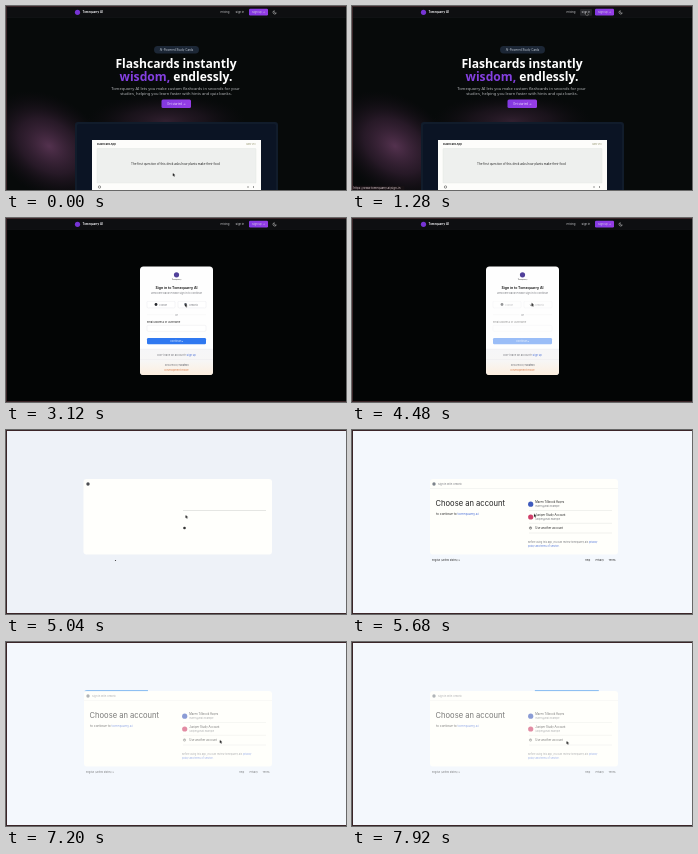
An HTML page for the animation above (8000 ms loop, 340 px wide and 184 px high).

```html
<!DOCTYPE html>
<html lang="en">
<head>
<meta charset="utf-8">
<title>Sign-in walkthrough</title>
<style>
html, body { margin: 0; width: 100%; height: 100%; overflow: hidden; background: #020505; }
svg { display: block; width: 100vw; height: 100vh; }
text { font: 2.6px Inter, "Noto Sans", sans-serif; fill: #222; }
.mid { text-anchor: middle; }
.bold { font-weight: 700; }
.nav { font-size: 2.7px; fill: #d8d8dc; }
.hero { font: 600 12.1px "Noto Sans", sans-serif; fill: #fff; }
.lead { font: 4.05px "Noto Sans", sans-serif; fill: #b4b6b9; }
.soft { fill: #75777d; }
.link { fill: #4a6fd8; }
.name { font-size: 2.8px; }
.tiny { font-size: 2.4px; }

/* One shared 8 s timeline */
.landing, .login, .loading, .accounts, .hover, .status, .progress, .picked {
  animation: 8s step-end infinite; visibility: hidden;
}
.landing { animation-name: landing; }
.login { animation-name: login; }
.loading { animation-name: loading; }
.accounts { animation-name: accounts; }
.hover { animation-name: hover; }
.status { animation-name: status; }
.progress { animation-name: progress; }
.picked { animation-name: picked; }
@keyframes landing { 0% { visibility: visible } 25%, 100% { visibility: hidden } }
@keyframes login { 25% { visibility: visible } 63%, 100% { visibility: hidden } }
@keyframes loading { 63% { visibility: visible } 64%, 100% { visibility: hidden } }
@keyframes accounts { 64%, 100% { visibility: visible } }
@keyframes hover { 12% { visibility: visible } 27%, 100% { visibility: hidden } }
@keyframes status { 14% { visibility: visible } 30%, 100% { visibility: hidden } }
@keyframes progress { 83.75%, 100% { visibility: visible } }
@keyframes picked { 79% { visibility: visible } 86%, 100% { visibility: hidden } }

.busy { animation: busy 8s linear infinite; }
@keyframes busy { 0%, 42% { opacity: 1 } 46%, 100% { opacity: .48 } }
.dim { animation: dim 8s linear infinite; }
@keyframes dim { 0%, 78% { opacity: 1 } 79%, 100% { opacity: .6 } }
.icon { animation: icon 8s step-end infinite; }
@keyframes icon { 0% { opacity: 1 } 44%, 100% { opacity: 0 } }
.spinner { animation: spinner 8s linear infinite; transform-origin: 179.5px 86.5px; }
@keyframes spinner {
  0%, 43.9% { opacity: 0; transform: none }
  44% { opacity: 1; transform: none }
  56%, 100% { opacity: 1; transform: rotate(720deg) }
}

.cursor { animation: cursor 8s ease-in-out infinite; }
@keyframes cursor {
  0%, 1% { transform: translate(166.7px, 167px) }
  11% { transform: translate(232px, 10px) }
  14%, 25% { transform: translate(234px, 6px) }
  35% { transform: translate(174px, 92px) }
  40%, 70% { transform: translate(179.5px, 85px) }
  74%, 79% { transform: translate(197.5px, 75.5px) }
  92%, 100% { transform: translate(214.5px, 99px) }
}

/* Indeterminate bar: 2 s cycle, in step with the 8 s loop */
.slide { animation: slide 2s -1.28s infinite; }
.grow { animation: grow 2s -1.28s infinite; }
@keyframes slide {
  0% { transform: translateX(-103.2px); animation-timing-function: cubic-bezier(.15, 0, .515, .41) }
  25% { transform: translateX(-32.4px); animation-timing-function: cubic-bezier(.31, .284, .8, .734) }
  48.35% { transform: translateX(55.5px); animation-timing-function: cubic-bezier(.4, .627, .6, .902) }
  100% { transform: translateX(198.1px) }
}
@keyframes grow {
  0% { transform: scaleX(.08); animation-timing-function: cubic-bezier(.205, .057, .577, .454) }
  19.15% { transform: scaleX(.457); animation-timing-function: cubic-bezier(.152, .196, .648, 1.004) }
  44.15% { transform: scaleX(.728); animation-timing-function: cubic-bezier(.258, -.003, .212, 1.38) }
  100% { transform: scaleX(.08) }
}
</style>
</head>
<body>
<svg viewBox="0 0 340 184" preserveAspectRatio="none">
  <defs>
    <radialGradient id="glow">
      <stop offset="0" stop-color="#5c3656" stop-opacity=".9"/>
      <stop offset=".5" stop-color="#3c233a" stop-opacity=".6"/>
      <stop offset="1" stop-color="#1a0f1a" stop-opacity="0"/>
    </radialGradient>
    <linearGradient id="violet">
      <stop offset="0" stop-color="#8339e2"/>
      <stop offset="1" stop-color="#963de6"/>
    </linearGradient>
    <linearGradient id="foot" x2="0" y2="1">
      <stop offset="0" stop-color="#f6f6f8"/>
      <stop offset=".45" stop-color="#f7f6f5"/>
      <stop offset="1" stop-color="#fdeedd"/>
    </linearGradient>
    <clipPath id="panel"><rect x="78" y="48" width="188" height="76.500" rx="3"/></clipPath>
    <clipPath id="sheet"><rect x="134" y="48.500" width="73" height="108.500" rx="3.500"/></clipPath>
  </defs>

  <rect width="340" height="184" fill="#030505"/>

  <g class="landing">
    <rect width="340" height="184" fill="#070a0a"/>
    <ellipse cx="43" cy="140" rx="68" ry="48" fill="url(#glow)" transform="rotate(35 43 140)"/>
    <ellipse cx="160" cy="115" rx="80" ry="27" fill="url(#glow)" opacity=".55"/>
    <rect x="148" y="40" width="45" height="7.500" rx="3.700" fill="#1c2736"/>
    <text class="mid" x="170.500" y="44.800" style="font-size:2.900px;fill:#c4ccd6">AI-Powered Study Cards</text>
    <text class="hero mid" x="170" y="61.500">Flashcards instantly</text>
    <text class="hero mid" x="170" y="74.500"><tspan fill="#8440e0">wisdom,</tspan> endlessly.</text>
    <text class="lead mid" x="169.500" y="83.600">Tomequarry AI lets you make custom flashcards in seconds for your</text>
    <text class="lead mid" x="170" y="89">studies, helping you learn faster with hints and quiz banks.</text>
    <rect x="155.500" y="93.500" width="29.500" height="8.500" rx="1.500" fill="url(#violet)"/>
    <text class="mid" x="170.300" y="98.800" style="font-size:2.900px;fill:#eadcff">Get started →</text>

    <rect x="69" y="116" width="203" height="72" rx="3" fill="#111c2b"/>
    <rect x="71" y="118" width="199" height="70" rx="2" fill="#0b1424"/>
    <rect x="86" y="134" width="169" height="50" fill="#fdfdfb"/>
    <text class="bold" x="91" y="139.300" style="font-size:2.700px">Flashcard App</text>
    <text x="240" y="139" style="font-size:2.200px;fill:#8b8b62">Card 1/10</text>
    <rect x="91" y="142.500" width="159" height="34.500" rx=".5" fill="#eef0ee" stroke="#dfe2df" stroke-width=".4"/>
    <text class="mid" x="169.500" y="159" style="font-size:3px">The first question of this deck asks how plants make their food</text>
    <circle cx="93.500" cy="181" r="1.200" fill="none" stroke="#333" stroke-width=".5"/>
    <path d="M242.500 180l-1 1 1 1M247 180l1 1-1 1" fill="none" stroke="#333" stroke-width=".5"/>
  </g>

  <g>
    <rect width="340" height="11.500" fill="#0e0f11"/>
    <rect y="11.500" width="340" height=".4" fill="#1b1c1f"/>
    <circle cx="71.500" cy="6.300" r="2.600" fill="#7734d4"/>
    <text class="bold" x="76.500" y="7.300" style="font-size:2.800px;fill:#f1f1f4">Tomequarry AI</text>
    <text class="nav" x="214.500" y="7.400">Pricing</text>
    <rect class="hover" x="228" y="3" width="12" height="6.800" rx="1" fill="#26272b"/>
    <text class="nav" x="229.500" y="7.400">Sign in</text>
    <rect x="243" y="2.800" width="19" height="6.600" rx="1.200" fill="url(#violet)"/>
    <text class="nav mid" x="252.500" y="7.200">Sign up →</text>
    <path d="M268.300 4.700a1.700 1.700 0 1 0 2 2.200a1.600 1.600 0 0 1-2-2.200z" fill="none" stroke="#ddd" stroke-width=".5"/>
  </g>

  <g class="login">
    <g clip-path="url(#sheet)">
      <rect x="134" y="48" width="73" height="110" fill="#fefefe"/>
      <rect x="134" y="131" width="73" height="27" fill="url(#foot)"/>
      <path d="M134 131.200h73M134 141.500h73" stroke="#e6e6ea" stroke-width=".4"/>
    </g>
    <circle cx="170.500" cy="56.800" r="2.600" fill="#51409a"/>
    <text class="mid" x="170.500" y="62.300" style="font-size:1.700px">Tomequarry</text>
    <text class="mid bold" x="170.500" y="71.300" style="font-size:3.500px">Sign in to Tomequarry AI</text>
    <text class="mid soft" x="170.500" y="76.400">Welcome back! Please sign in to continue</text>
    <g class="busy">
      <g fill="#fff" stroke="#e4e4e8" stroke-width=".4">
        <rect x="141" y="83.300" width="28" height="6.600" rx="1.200"/>
        <rect x="172" y="83.300" width="28" height="6.600" rx="1.200"/>
      </g>
      <circle cx="150" cy="86.500" r="1.400" fill="#24262b"/>
      <text class="soft" x="153.500" y="87.500">Forkle</text>
      <circle class="icon" cx="179.500" cy="86.500" r="1.400" fill="#5e6672"/>
      <text class="soft" x="183" y="87.500">Ombrix</text>
    </g>
    <path class="spinner" d="M179.500 85.200a1.300 1.300 0 1 1-1.300 1.300" fill="none" stroke="#555" stroke-width=".5"/>
    <path d="M141 96.700h26.500M173.500 96.700h26.500" stroke="#ececef" stroke-width=".3"/>
    <text class="mid soft" x="170.500" y="97.500">or</text>
    <g class="busy">
      <text x="141" y="105">Email address or username</text>
      <rect x="141" y="107.300" width="59" height="6" rx="1.200" fill="#fff" stroke="#e4e4e8" stroke-width=".4"/>
      <rect x="141" y="120" width="59" height="6.200" rx="1.200" fill="#2f78f0"/>
      <text class="mid" x="170.500" y="124" style="fill:#e6efff">Continue ▸</text>
    </g>
    <text class="mid soft" x="170.500" y="137.800">Don’t have an account? <tspan class="link">Sign up</tspan></text>
    <text class="mid soft" x="170.500" y="148">Secured by <tspan class="bold">Vostrel</tspan></text>
    <text class="mid" x="170.500" y="152.900" style="fill:#dc7a45">Development mode</text>
    <rect y="183" width="340" height="1" fill="#3b2629"/>
  </g>

  <g class="loading">
    <rect width="340" height="184" fill="#eef2f8"/>
    <rect x="77.500" y="49" width="188.500" height="75.500" rx="3" fill="#fffffc"/>
    <circle cx="82" cy="54" r="1.700" fill="#4a4c50"/>
    <path d="M177 80.500h83" stroke="#dadcd8" stroke-width=".7"/>
    <circle cx="178.500" cy="98" r="1.300" fill="#333"/>
    <circle cx="109.500" cy="130.500" r=".6" fill="#333"/>
    <rect y="183" width="340" height="1" fill="#3b2629"/>
  </g>

  <g class="accounts">
    <rect width="340" height="184" fill="#f4f8fd"/>
    <rect x="78" y="49" width="188" height="75.500" rx="3" fill="#fffffb"/>
    <rect class="picked" x="174" y="68" width="88" height="12.500" rx="1" fill="#f0f4fb"/>
    <g class="dim">
      <circle cx="82" cy="54" r="1.700" fill="#7d838a"/>
      <text x="86" y="55" class="soft">Sign in with Ombrix</text>
      <path d="M78 58.500h188" stroke="#e4e6e6" stroke-width=".4"/>
      <text x="83.500" y="75.800" style="font-size:7.600px">Choose an account</text>
      <text x="84" y="85.300" style="font-size:3.200px">to continue to <tspan class="link">tomequarry.ai</tspan></text>
      <circle cx="178.700" cy="74.200" r="2.600" fill="#3f5bbd"/>
      <text class="name" x="183.300" y="73.300">Maren Tilbrook Hayes</text>
      <text class="tiny soft" x="183.300" y="77.300">maren@mail.example</text>
      <circle cx="178.700" cy="87" r="2.600" fill="#d0406a"/>
      <text class="name" x="183.300" y="86.100">Juniper Study Account</text>
      <text class="tiny soft" x="183.300" y="90.100">juniper@mail.example</text>
      <circle cx="178.500" cy="98" r="1.200" fill="none" stroke="#444" stroke-width=".5"/>
      <circle cx="178.500" cy="97.800" r=".5" fill="#444"/>
      <text class="name" x="183.300" y="99">Use another account</text>
      <path d="M177 80.500h83M177 93.300h83M177 103h83" stroke="#d9dcda" stroke-width=".4"/>
      <text class="tiny soft" x="176" y="112.900">Before using this app, you can review tomequarry.ai’s <tspan class="link">privacy</tspan></text>
      <text class="tiny link" x="176" y="116.700">policy and terms of service.</text>
      <text class="tiny" x="80" y="131.200">English (United States) ▾</text>
      <g class="soft">
        <text class="tiny" x="233" y="131.200">Help</text>
        <text class="tiny" x="243.500" y="131.200">Privacy</text>
        <text class="tiny" x="256.500" y="131.200">Terms</text>
      </g>
    </g>
    <rect y="183" width="340" height="1" fill="#3b2629"/>
  </g>

  <g class="progress" clip-path="url(#panel)">
    <g transform="translate(78 0)">
      <g class="slide"><rect class="grow" y="48" width="188" height="1.100" fill="#8fc0f2"/></g>
    </g>
  </g>

  <path d="M0 0H340V1H1V184H0Z" fill="#3b2629"/>
  <g class="status">
    <rect x="1" y="179.800" width="51.500" height="4.200" fill="#171114"/>
    <text x="1.500" y="182.900" style="font-size:2.900px;fill:#e2d0d3">https://www.tomequarry.ai/sign-in</text>
  </g>
  <path class="cursor" d="M0 0V3.200L.8 2.600 1.300 3.700 1.900 3.400 1.400 2.300H2.400Z" fill="#111" stroke="#fff" stroke-width=".4" paint-order="stroke"/>
</svg>
</body>
</html>
```
